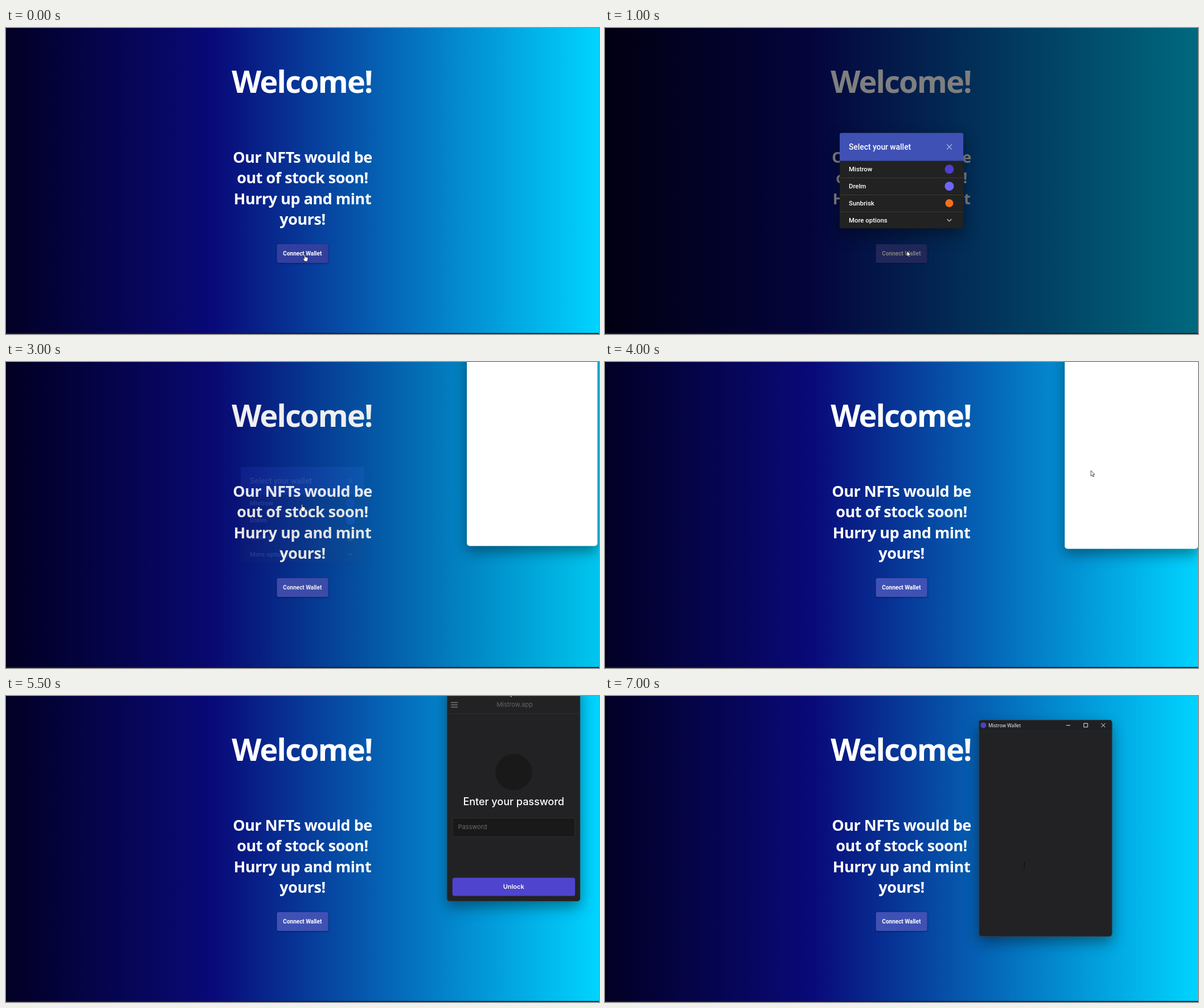
Recreate the animation shown at these times as an HTML page. Size 1041 by 538 pixels, loop 8000 ms.

```html
<!DOCTYPE html>
<html lang="en">
<head>
<meta charset="utf-8">
<title>Connect a wallet</title>
<style>
  html, body { margin: 0; width: 100%; height: 100%; overflow: hidden; }
  body { background: linear-gradient(90deg, #020024, #090979 35%, #00d4ff); }
  svg { display: block; width: 1041px; height: 538px; }
  text { fill: #fff; }
  .page { font: 700 27px "Open Sans", "Noto Sans", sans-serif; letter-spacing: -.018em; text-anchor: middle; }
  .page .title { font-size: 54px; letter-spacing: -.034em; }
  .connect { font: 600 10px Roboto, sans-serif; text-anchor: middle; }
  .connect rect { filter: drop-shadow(0 1px 1.5px #0006); }
  #modal { font: 500 11.4px Roboto, sans-serif; }
  #modal .title { font-size: 13.8px; }
  .panel { filter: drop-shadow(0 11px 14px #0006); }
  #win { font: 11px Inter, sans-serif; }
  #win .frame { filter: drop-shadow(0 10px 12px #0006); }
  #win .bar { font: 8.3px "Open Sans", "Noto Sans", sans-serif; }
  #win .mid { text-anchor: middle; }
  .line { fill: none; stroke: #fff; }
  .cursor { fill: #fff; stroke: #000; stroke-width: .7; stroke-linejoin: round; }
</style>
</head>
<body>
<svg viewBox="0 0 1041 538">
  <g class="page">
    <text class="title" x="519.4" y="114">Welcome!</text>
    <text x="520.5" y="237">Our NFTs would be</text>
    <text x="520.5" y="273.4">out of stock soon!</text>
    <text x="520.5" y="309.8">Hurry up and mint</text>
    <text x="520.5" y="346.2">yours!</text>
  </g>
  <g class="connect">
    <rect id="button" x="475.5" y="380" width="90" height="33" rx="3"/>
    <text x="520.3" y="400">Connect Wallet</text>
  </g>

  <g id="modal">
    <rect width="1041" height="538" fill="#000" opacity=".5"/>
    <g class="panel">
      <rect x="412" y="184.4" width="217" height="167.8" rx="3" fill="#222"/>
      <path d="M412 233.5V187.4q0-3 3-3h211q3 0 3 3v46.1z" fill="#3f51b5"/>
    </g>
    <rect id="hover" x="412" width="217" height="29.5" fill="#373737"/>
    <path d="M412 263.5h217M412 293.5h217M412 323.3h217" class="line" style="stroke:#3b3b3b"/>
    <text class="title" x="428" y="214">Select your wallet</text>
    <text x="428" y="252">Mistrow</text>
    <text x="428" y="282">Drelm</text>
    <text x="428" y="312">Sunbrisk</text>
    <text x="428" y="341.6">More options</text>
    <circle cx="604.4" cy="248.3" r="8" fill="#4e3fd0"/>
    <circle cx="604.4" cy="278.2" r="8" fill="#6e66fa"/>
    <circle cx="604.4" cy="308" r="7" fill="#f5701d"/>
    <path d="M600 204.5l9 9m0-9l-9 9" class="line" style="stroke:#b0b4cf;stroke-width:1.2"/>
    <path d="M600.6 336l3.8 3.8 3.8-3.8" class="line" style="stroke:#bbb;stroke-width:1.5"/>
  </g>

  <g id="win">
    <rect id="blank" class="frame" width="234" height="381" rx="5" fill="#fff"/>
    <g id="dark">
      <rect class="frame" width="234" height="381" rx="5" fill="#222224"/>
      <path d="M0 19.7V5q0-5 5-5h224q5 0 5 5v14.7z" fill="#1d2124"/>
      <path d="M0 19.9h234" class="line" style="stroke:#2c2f32;stroke-width:.7"/>
      <rect x=".3" y=".3" width="233.4" height="380.4" rx="5" class="line" style="stroke:#44494e;stroke-width:.6"/>
      <circle cx="8" cy="9.4" r="5" fill="#4e3fc4"/>
      <text class="bar" x="16.7" y="12.5">Mistrow Wallet</text>
      <path d="M153.5 9.6h7M184.4 6.1h6.6v6.6h-6.6zM215 6l7 7m0-7l-7 7" class="line" style="stroke-width:.9"/>
    </g>
    <g id="form">
      <path d="M0 51.2h234" class="line" style="stroke:#313131"/>
      <path d="M7 31.5h12M7 35.5h12M7 39.5h12" class="line" style="stroke:#777;stroke-width:1.3"/>
      <text class="mid" x="119" y="39" style="fill:#666">Mistrow.app</text>
      <circle cx="117.4" cy="154" r="32" fill="#191919"/>
      <text class="mid" x="117.2" y="212" style="font-size:18px;font-weight:500">Enter your password</text>
      <rect x="10" y="234.5" width="214.5" height="33" rx="3.5" fill="#19191a" stroke="#2e2e2f"/>
      <text x="19.5" y="254.3" style="fill:#6a6a6a">Password</text>
      <rect x="9.7" y="339.5" width="215.3" height="32" rx="3.5" fill="#4e44ce"/>
      <text class="mid" x="117.2" y="359.2" style="font-weight:600">Unlock</text>
    </g>
  </g>

  <rect y="536.3" width="1041" height="1.7" fill="#1c1c24"/>

  <g class="cursor">
    <path id="arrow" d="M0 0V9.6L2.2 7.6 3.6 10.8 5.2 10.1 3.8 7H6.8Z"/>
    <path id="hand" d="M2.7 7.6V1.2a.9.9 0 0 1 1.8 0V4.6L8 5.2Q9 5.5 9 6.6V8.8L8 12.5H3.6L.6 8.6Q0 7.6 1 7.3Z"/>
    <path id="beam" d="M-1.5-4.5h3M0-4.5v9M-1.5 4.5h3" fill="none"/>
  </g>
</svg>
<script>
const $ = id => document.getElementById(id);
const LOOP = 8000;

// Each step overrides the one before it; win is [x, y, scale].
const steps = [
  { at: 0, fade: 0, press: true, cursor: ['hand', 521, 398], win: null, row: -1 },
  { at: 500, fade: .03 },
  { at: 1000, fade: 1, press: false, cursor: ['arrow', 530, 392] },
  { at: 1500, row: 1, cursor: ['hand', 517, 279] },
  { at: 2000, row: 0, cursor: ['hand', 516, 250] },
  { at: 3000, fade: .12, row: -1, win: [809, -50, .98], view: 'blank' },
  { at: 3500, fade: 0, win: [807, -52.5, 1], cursor: ['arrow', 751, 233] },
  { at: 4000, cursor: ['arrow', 853, 191] },
  { at: 4500, view: 'form', cursor: ['arrow', 912, -4] },
  { at: 5000, cursor: ['none'] },
  { at: 5500, win: [774, -20, 1], cursor: ['arrow', 883, -8] },
  { at: 6000, win: [666.5, 36, 1], cursor: ['arrow', 776, 47.5] },
  { at: 6500, win: [656.2, 42, 1], cursor: ['beam', 736, 297] },
  { at: 7000, view: 'dark' }
];

const show = (id, on) => $(id).style.display = on ? '' : 'none';
const place = (id, x, y, k = 1) => $(id).setAttribute('transform', `translate(${x} ${y}) scale(${k})`);

function draw(t) {
  const s = Object.assign({}, ...steps.filter(step => step.at <= t));
  $('button').setAttribute('fill', s.press ? '#323f9e' : '#4051b5');
  $('modal').setAttribute('opacity', s.fade);
  show('hover', s.row >= 0);
  $('hover').setAttribute('y', 233.5 + 30 * s.row);

  show('win', s.win);
  if (s.win) place('win', ...s.win);
  show('blank', s.view === 'blank');
  show('dark', s.view !== 'blank');
  show('form', s.view === 'form');

  const [kind, x, y] = s.cursor;
  for (const id of ['arrow', 'hand', 'beam']) show(id, id === kind);
  if (kind !== 'none') place(kind, x, y);
}

const start = performance.now();
function tick() {
  draw((performance.now() - start) % LOOP);
  requestAnimationFrame(tick);
}
tick();
</script>
</body>
</html>
```
